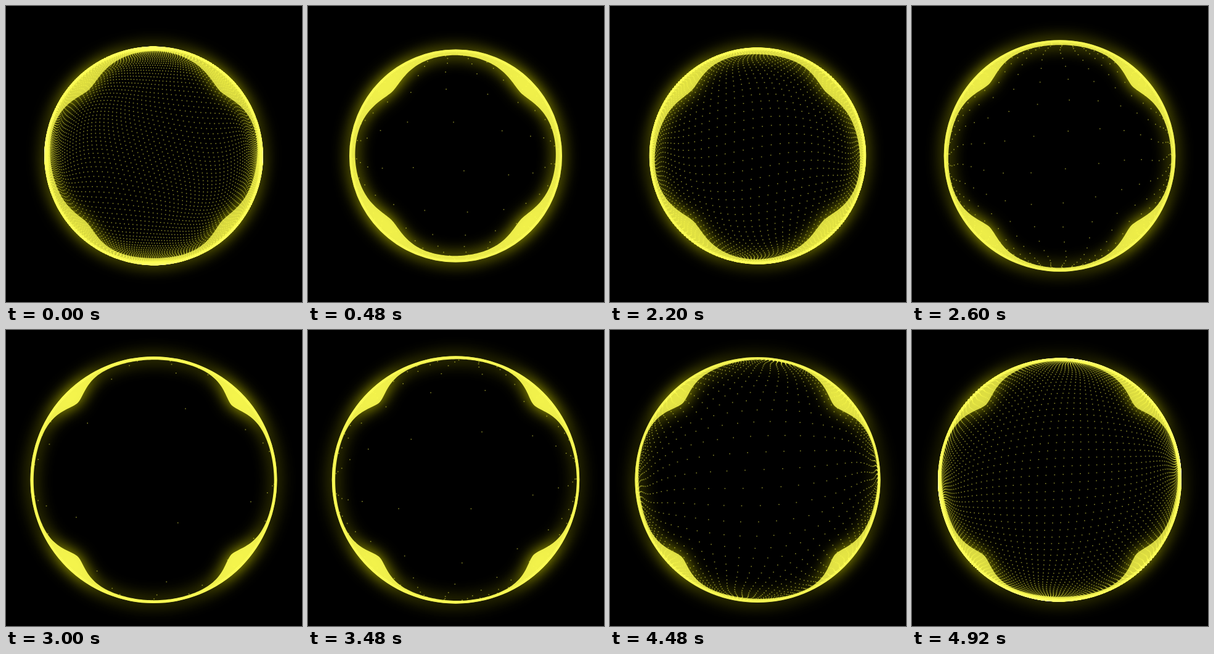
Animation of 480x480 px, one loop 4.96 s. Source, as an HTML page with a canvas:

```html
<!DOCTYPE html>
<html lang="en">
<head>
<meta charset="utf-8">
<title>Particle sphere</title>
<style>
  html, body { margin: 0; height: 100%; overflow: hidden; background: #000; }
  canvas { display: block; width: 480px; height: 480px; }
</style>
</head>
<body>
<canvas id="stage" width="480" height="480"></canvas>
<script>
const ctx = document.getElementById('stage').getContext('2d');
const LOOP = 4960, CX = 239.5, CY = 243, TAU = 2 * Math.PI, RAD = TAU / 360;

// The sphere breathes: its radius and the spacing of its dots.
const beats = [
  { t: 0, radius: 177, step: .045 },
  { t: 480, radius: 172.5, step: .5 },
  { t: 1520, radius: 163, step: .57 },
  { t: 2200, radius: 175.5, step: .092 },
  { t: 3000, radius: 200, step: 1.1 },
  { t: 4000, radius: 201.5, step: .38 },
  { t: 4920, radius: 197, step: .07 },
  { t: LOOP, radius: 197, step: .07 }
];

function stateAt(t) {
  const n = beats.findIndex(b => b.t > t), a = beats[n - 1], b = beats[n];
  const p = (t - a.t) / (b.t - a.t), ease = p * p * (3 - 2 * p);
  const radius = a.radius + (b.radius - a.radius) * ease;
  const step = a.step * Math.pow(b.step / a.step, ease);
  return { radius, step, dense: 1 / (1 + 6 * step), time: t / LOOP };
}

// Flat grid projected on a hemisphere: its lines meet on the rim.
function drawGrid({ radius, step, dense, time }) {
  const tilt = (2 - 8 * time) * RAD;
  const lean = -10 * Math.sin(TAU * (.9 * time + .02)) * RAD;
  const warp = .02 + .12 * dense * (1 - time), phase = TAU * time;
  const ca = Math.cos(tilt), sa = Math.sin(tilt);
  const cb = Math.cos(lean), sb = Math.sin(lean);
  const span = Math.min(60, Math.round(4 / step));
  const place = i => step * i * (1 + (i / 30) ** 2);

  ctx.globalCompositeOperation = 'lighter';
  ctx.fillStyle = 'rgba(255,255,75,.45)';
  for (let j = -span; j <= span; j++) {
    const y = place(j + .35);
    for (let i = -span; i <= span; i++) {
      const x = place(i + .4 * time);
      const u = x * ca - y * sb + warp * Math.sin(2.3 * y + x + phase);
      const v = x * sa + y * cb + warp * Math.sin(2.6 * x - y - phase);
      const f = radius / Math.sqrt(1 + u * u + v * v);
      ctx.fillRect(CX + u * f - .85, CY + v * f - .85, 1.7, 1.7);
    }
  }
  ctx.globalCompositeOperation = 'source-over';
}

// The rim swells on the diagonals, more narrowly the larger the sphere.
function rimDepth(deg, { radius, dense, time }) {
  const shrink = 200 - radius;
  const width = 11 + .2 * shrink, height = 20 - .15 * shrink;
  let depth = 5 + .17 * shrink + 2.5 * dense * Math.sin(5 * deg * RAD + TAU * time);
  for (let i = 0; i < 4; i++) {
    const off = Math.abs((deg - 44 - 90.7 * i + 540) % 360 - 180) / width;
    depth += height * Math.exp(-(off ** 1.7));
  }
  return depth;
}

function drawRim(s) {
  ctx.beginPath();
  ctx.arc(CX, CY, s.radius, 0, TAU);
  for (let deg = 0; deg < 360; deg++) {
    const r = s.radius - rimDepth(deg, s), a = deg * RAD;
    ctx[deg ? 'lineTo' : 'moveTo'](CX + r * Math.cos(a), CY + r * Math.sin(a));
  }
  ctx.closePath();
  ctx.shadowColor = 'rgba(255,255,0,.85)';
  ctx.shadowBlur = 26;
  ctx.fillStyle = `rgba(252,252,82,${.97 - .25 * s.dense})`;
  ctx.fill('evenodd');
  ctx.shadowBlur = 0;

  ctx.beginPath();
  ctx.arc(CX, CY, s.radius - 2, 0, TAU);
  ctx.lineWidth = 4;
  ctx.strokeStyle = 'rgba(255,255,90,.65)';
  ctx.stroke();
}

function frame() {
  const s = stateAt(performance.now() % LOOP);
  ctx.fillStyle = '#000';
  ctx.fillRect(0, 0, 480, 480);
  drawGrid(s);
  drawRim(s);
  requestAnimationFrame(frame);
}
frame();
</script>
</body>
</html>
```
